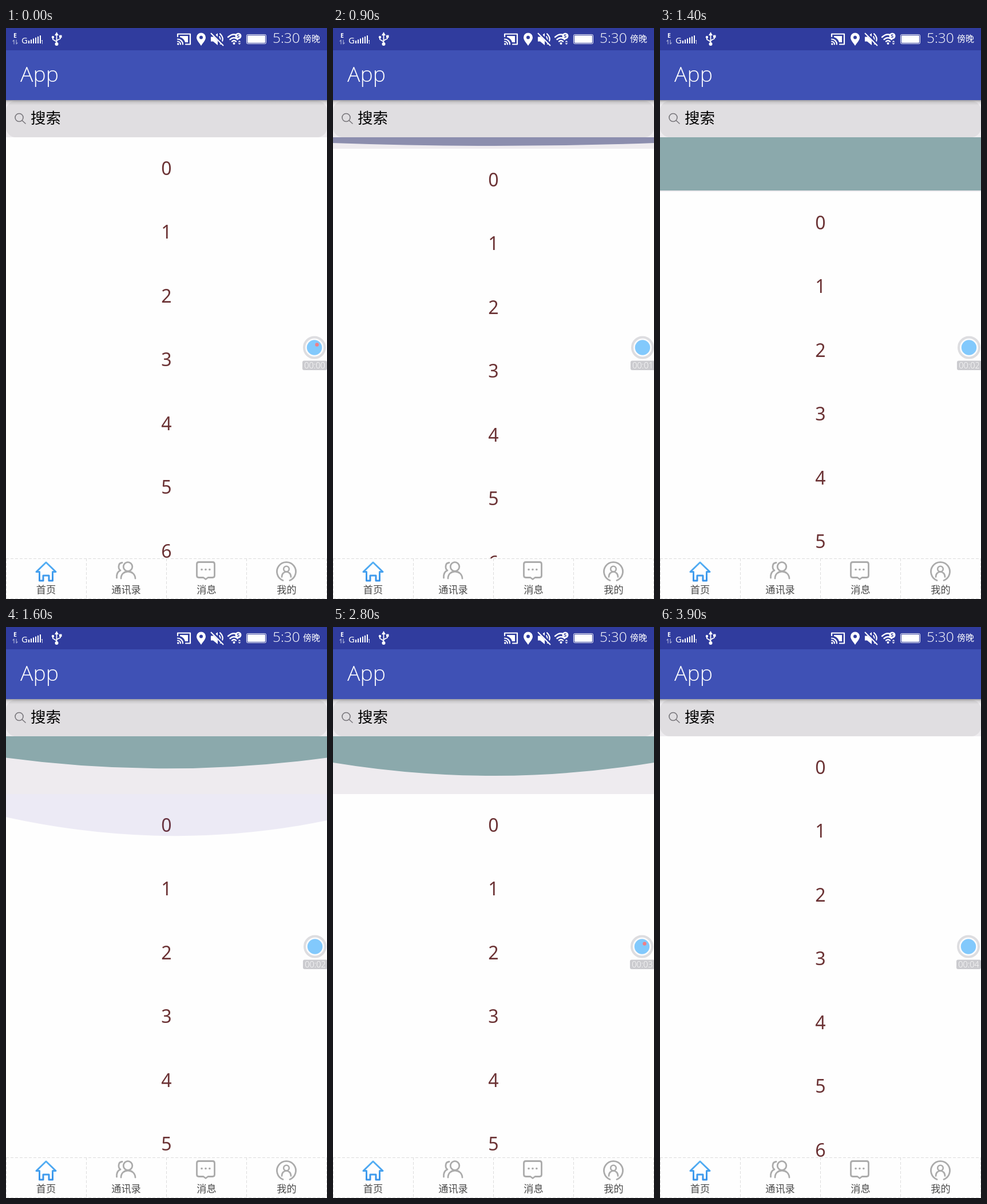
These frames come from a looping animation (561 px wide and 998 px high, 4 s). An HTML page:

```html
<!DOCTYPE html>
<html lang="zh">
<head>
<meta charset="utf-8">
<style>
html, body { margin: 0; width: 100%; height: 100%; overflow: hidden; background: #fefefe; }
svg { display: block; width: 561px; height: 998px; }
text { font-family: "Noto Sans", "Noto Sans CJK SC", "Noto Sans CJK", sans-serif; }
.light { font-family: "Open Sans", "Noto Sans", sans-serif; font-weight: 300; }
.line { fill: none; stroke-linecap: round; stroke-linejoin: round; }
</style>
</head>
<body>
<svg viewBox="0 0 561 998">
  <defs>
    <linearGradient id="shade" x2="0" y2="1">
      <stop offset="0" stop-color="#000" stop-opacity=".32"/>
      <stop offset=".4" stop-color="#000" stop-opacity=".1"/>
      <stop offset="1" stop-color="#000" stop-opacity="0"/>
    </linearGradient>
    <linearGradient id="blue" x2="0" y2="1">
      <stop offset="0" stop-color="#55b0f4"/>
      <stop offset="1" stop-color="#3793ea"/>
    </linearGradient>
  </defs>

  <rect y="127" width="561" height="871" fill="#eeebef"/>
  <path id="wave"/>
  <g id="list">
    <rect y="191" width="561" height="810" fill="#fefefe"/>
    <g id="rows" class="light" font-size="32" text-anchor="middle" fill="#6b3234"></g>
    <path id="glow" fill="#533fa5"/>
  </g>

  <rect y="126" width="561" height="65" fill="#eeecef"/>
  <rect y="127.500" width="561" height="63.500" rx="17" fill="#e0dee1"/>
  <rect y="126" width="561" height="9" fill="url(#shade)"/>
  <g class="line" stroke="#77757a" stroke-width="1.600">
    <circle cx="23" cy="156.500" r="7"/><path d="M28 161.500L34 167"/>
  </g>
  <text x="43" y="166.500" font-size="26.500" fill="#000">搜索</text>

  <rect width="561" height="126" fill="#3f51b5"/>
  <rect width="561" height="39" fill="#303c9e"/>
  <text class="light" x="25" y="94" font-size="37.500" fill="#fff">App</text>

  <g fill="#fff">
    <text x="13" y="17" font-size="10.500" font-weight="700">E</text>
    <path class="line" d="M14 28V21L12 23M18 21V28L20 26" stroke="#aab0d8" stroke-width="1.200"/>
    <text x="27" y="27" font-size="15">G</text>
    <g id="bars"></g>
    <text x="61" y="28" font-size="8">1</text>
    <path class="line" d="M88.500 12V27M88.500 24L82 20V16M88.500 22L95 18.500V15" stroke="#fff" stroke-width="1.800"/>
    <path d="M88.500 7L92 13H85Z"/><circle cx="88.500" cy="28" r="3"/>
    <circle cx="82" cy="16" r="2.200"/><rect x="93" y="12.500" width="4.500" height="4.500"/>

    <path class="line" d="M300 15V10.500H322V28.500H314M300 19.500A9 9 0 0 1 309 28.500M300 23.500A5 5 0 0 1 305 28.500" stroke="#fff" stroke-width="2.200"/>
    <path d="M304 14H318V25H313A13 13 0 0 0 304 16Z"/><circle cx="300.800" cy="28" r="1.800"/>
    <path fill-rule="evenodd" d="M341 31C337 25 333 21 333 16.500A8 8 0 0 1 349 16.500C349 21 345 25 341 31ZM341 13.500A3 3 0 0 0 341 19.500A3 3 0 0 0 341 13.500Z"/>
    <path d="M358 15.500H362L370 9V30L362 23.500H358Z"/>
    <path class="line" d="M373 15Q376 19.500 373 24M374 10Q383 19 375 28" stroke="#fff" stroke-width="2"/>
    <path d="M359 8L381 30" stroke="#303c9e" stroke-width="5"/>
    <path d="M358 9L380 31" stroke="#fff" stroke-width="2"/>
    <path class="line" d="M388 16Q398 7 407 15M391.500 20Q398.500 14 405 20M395 23.500Q398.500 20.500 402 23.500" stroke="#fff" stroke-width="2.400"/>
    <circle cx="398.500" cy="27" r="2"/>
    <circle cx="406" cy="14" r="5.500"/>
    <text x="403.300" y="17.300" font-size="9" font-weight="700" fill="#303c9e">S</text>
    <path d="M408 22L410.500 24.500H405.500ZM408 29L410.500 26.500H405.500Z"/>
    <rect x="420.500" y="11.500" width="34" height="16" rx="2" fill="none" stroke="#fff"/>
    <rect x="422" y="13" width="31" height="13" rx="1"/>
    <text class="light" x="466" y="25.500" font-size="24.500">5:30</text>
    <text x="519" y="24" font-size="15">傍晚</text>
  </g>

  <rect y="927" width="561" height="71" fill="#fefefe"/>
  <path d="M0 927.500H561M0 997.500H561M.5 927V998M140.500 927V998M280.500 927V998M420.500 927V998M560.500 927V998" stroke="#dcdcdc" stroke-dasharray="5 3"/>
  <path class="line" stroke="url(#blue)" stroke-width="3" d="M70 934L87 950.500H81.500V966H75V957H65V966H58.500V950.500H53Z"/>
  <g class="line" stroke="#ababab" stroke-width="2.800">
    <circle cx="213" cy="941.500" r="7.800"/>
    <path d="M201 962C201 946 225 946 226 962M203 934.500C195 935 196 946 200 948C195 950 193 955 193.500 961"/>
    <path d="M337 933.500H361Q364.500 933.500 364.500 937V957Q364.500 960.500 361 960.500H353L349 963.500L345 960.500H337Q333.500 960.500 333.500 957V937Q333.500 933.500 337 933.500Z"/>
    <path d="M342 946.500H342.100M348.900 946.500H349M355.800 946.500H355.900" stroke-width="3.600"/>
    <path d="M484 965.500A16.500 16.500 0 1 1 496 965.500"/>
    <circle cx="490" cy="945.500" r="4.800" stroke-width="2.600"/>
    <path d="M482 959.500C482 947.500 498 947.500 498 959.500" stroke-width="2.600"/>
  </g>
  <g font-size="17.200" text-anchor="middle" fill="#4a4a4a">
    <text x="70" y="987.500">首页</text><text x="210" y="987.500">通讯录</text>
    <text x="350.500" y="987.500">消息</text><text x="490.500" y="987.500">我的</text>
  </g>

  <g id="recorder">
    <circle cy="558.500" r="18" fill="#fbfbfc" stroke="#dddde0" stroke-width="4"/>
    <circle cy="558.500" r="13.200" fill="#82c9fc"/>
    <circle id="dot" cx="4.500" cy="553.500" r="3.200" fill="#f07f86"/>
    <rect x="-21" y="581.500" width="43" height="16.500" rx="3" fill="#cbcbcf"/>
    <text id="clock" class="light" x=".5" y="594.500" font-size="14.500" text-anchor="middle" fill="#fff"></text>
  </g>
</svg>
<script>
const LOOP = 4000, STEP = 100, TOP = 191;
const el = id => document.getElementById(id);
const wave = el('wave'), list = el('list'), glow = el('glow');
const recorder = el('recorder'), dot = el('dot'), clock = el('clock');

for (let i = 0; i < 7; i++)
  el('rows').innerHTML += `<text x="280.5" y="${256.5 + i * 111.5}">${i}</text>`;
for (let i = 0; i < 6; i++)
  el('bars').innerHTML += `<rect x="${39 + i * 4}" y="${22 - i * 1.8}" width="2" height="${5 + i * 1.8}"/>`;

// [time, value] pairs
const pull = [[600, 0], [700, 3], [800, 10], [900, 20], [1100, 44], [1200, 57],
  [1300, 75], [1400, 95], [1500, 101], [3500, 101], [3600, 66], [3700, 30], [3800, 8], [3900, 0]];
const bounce = [[1400, 93], [1500, 62], [1600, 37.5], [1800, 42], [2100, 46]];
const bend = [[1400, 1], [1600, 2]];
const glowSize = [[1400, 0], [1500, 40], [1600, 72], [1800, 55], [2100, 0]];
const glowAlpha = [[1600, .1], [1800, .06], [2100, 0]];
const ticks = [300, 1300, 2100, 3200];
const shift = [539, 541, 540, 540, 539];

function at(keys, t) {
  if (t <= keys[0][0]) return keys[0][1];
  for (let i = 1; i < keys.length; i++) {
    const [t0, a] = keys[i - 1], [t1, b] = keys[i];
    if (t <= t1) return a + (b - a) * (t - t0) / (t1 - t0);
  }
  return keys[keys.length - 1][1];
}

function draw(t) {
  const off = at(pull, t), loading = t >= 1400;
  const edge = !loading ? off / 2 : t <= 3500 ? at(bounce, t) : off * 46 / 101;
  const mid = edge * (loading ? at(bend, t) : 2);
  wave.setAttribute('d', `M0 ${TOP}V${TOP + edge}Q280.5 ${TOP + mid} 561 ${TOP + edge}V${TOP}Z`);
  wave.setAttribute('fill', loading ? '#8ba9ac' : '#8c8eae');
  list.setAttribute('transform', `translate(0 ${off})`);

  const g = at(glowSize, t);
  glow.setAttribute('d', `M0 ${TOP}V${TOP + g * .56}Q285 ${TOP + g * 1.43} 561 ${TOP + g * .64}V${TOP}Z`);
  glow.setAttribute('fill-opacity', at(glowAlpha, t));

  const sec = ticks.filter(x => t >= x).length;
  clock.textContent = '00:0' + sec;
  dot.setAttribute('visibility', sec % 3 ? 'hidden' : 'visible');
  recorder.setAttribute('transform', `translate(${shift[sec]} 0)`);
}

const start = performance.now();
function tick(now) {
  const t = Math.max(0, now - start) % LOOP;
  draw(Math.floor(t / STEP) * STEP);
  requestAnimationFrame(tick);
}
draw(0);
requestAnimationFrame(tick);
</script>
</body>
</html>
```
